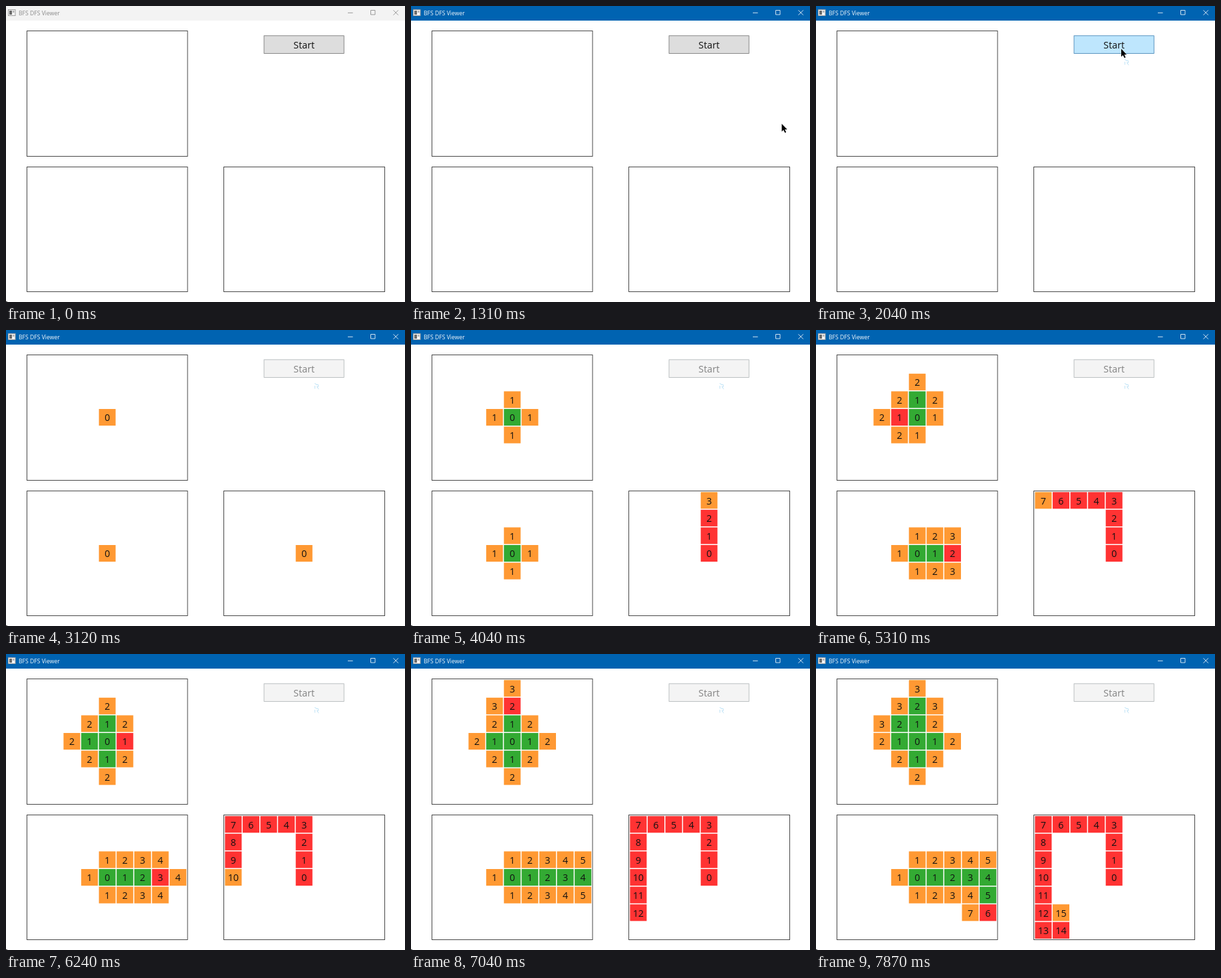
An HTML page that plays this animation: 600 by 446 pixels, repeating every 7.99 s.

```html
<!DOCTYPE html>
<html lang="en">
<head>
<meta charset="utf-8">
<title>BFS DFS Viewer</title>
<style>
  html, body { margin: 0; width: 100%; height: 100%; overflow: hidden; background: #fff; }
  svg { display: block; width: 600px; height: 446px; }
  text { font-family: "Open Sans", "Noto Sans", sans-serif; }
  .panel { fill: #fff; stroke: #484848; }
  #bar { color: #8a8a8a; fill: #f3f3f3; }
  #cells text, #label { font-size: 14.3px; text-anchor: middle; fill: #111; }
  #caption { font-size: 8.65px; fill: currentColor; }
  #controls { fill: none; stroke: currentColor; stroke-width: .85; }
  #button { stroke-width: .8; fill: #ddd; stroke: #707070; }
  .hover #button { fill: #bee6fd; stroke: #3c7fb1; }
  .pressed #button { fill: #c4e5f6; stroke: #2c628b; }
  .disabled #button { fill: #f4f4f4; stroke: #adb2b5; }
  .disabled #label { fill: #838383; }
  #echo { fill: none; stroke: #c0e3f6; }
  .idle #echo { display: none; }
</style>
</head>
<body>
<svg id="stage" viewBox="0 0 600 446">
  <rect width="600" height="446" fill="#fff"/>
  <g id="bar">
    <rect width="600" height="22"/>
    <rect x="3.5" y="5.5" width="10.5" height="9" fill="#f4f4f4" stroke="#a0a0a0"/>
    <rect x="5" y="7" width="4" height="6" fill="#6c6c6c"/>
    <rect x="10" y="7" width="2.5" height="3" fill="#b4b4b4"/>
    <text id="caption" x="19" y="13.6">BFS DFS Viewer</text>
    <path id="controls" d="M514 10.3h7.6M548.5 6.5h6.5v6.5h-6.5zM582.5 6.3l7.4 7.4M589.9 6.3l-7.4 7.4"/>
  </g>
  <rect class="panel" x="31.5" y="37.5" width="241.5" height="189"/>
  <rect class="panel" x="31.5" y="242.5" width="241.5" height="188"/>
  <rect class="panel" x="327.5" y="242.5" width="242" height="188"/>
  <rect y="445" width="2" height="1" fill="#444"/>
  <rect id="button" x="388" y="44.8" width="120.2" height="26.7"/>
  <text id="label" x="448.2" y="64.2">Start</text>
  <path id="echo" d="M464 80.5l3 1.5M464.5 84v4.5M466.5 82.5h3.2v3h-2.5M468 86l2.2 3.2"/>
  <g id="cells"></g>
  <path id="cursor" d="M0 .6V12.4L2.6 10L4.8 14.2L6.6 13.4L4.6 9.2H8.2Z" stroke="#fff" stroke-width=".9" paint-order="stroke"/>
</svg>
<script>
const LOOP = 7990;
const CAPTURE = 66.68;      // the screen refreshes in steps of this length
const SEARCH_START = 3098;
const STEP = 2.36;          // refreshes per search step
const COLS = 9, ROWS = 7, PITCH = 26.6, SIZE = 25.1;
const ORANGE = "#ff9933", RED = "#ff3333", GREEN = "#33aa33";
const DIRS = [[0, -1], [-1, 0], [0, 1], [1, 0]];

const $ = id => document.getElementById(id);
const key = (x, y) => y * COLS + x;
const inside = (x, y) => x >= 0 && y >= 0 && x < COLS && y < ROWS;
const progress = (t, from, to) => Math.min(1, Math.max(0, (t - from) / (to - from)));
const lerp = (a, b, p) => a + (b - a) * p;
const mix = (from, to, p) => `rgb(${from.map((v, i) => Math.round(lerp(v, to[i], p)))})`;

// Each yield is one visible step: [x, y, depth, colour]
function* frontierSearch(takeNext) {
  const seen = new Set([key(4, 3)]);
  const open = [[4, 3, 0]];
  yield [4, 3, 0, ORANGE];
  while (open.length) {
    const [x, y, depth] = takeNext(open);
    yield [x, y, depth, RED];
    for (const [dx, dy] of DIRS) {
      const nx = x + dx, ny = y + dy;
      if (!inside(nx, ny) || seen.has(key(nx, ny))) continue;
      seen.add(key(nx, ny));
      open.push([nx, ny, depth + 1]);
      yield [nx, ny, depth + 1, ORANGE];
    }
    yield [x, y, depth, GREEN];
  }
}

function* recursiveSearch(x = 4, y = 3, depth = 0, seen = new Set()) {
  seen.add(key(x, y));
  yield [x, y, depth, ORANGE];
  yield [x, y, depth, RED];
  for (const [dx, dy] of DIRS) {
    const nx = x + dx, ny = y + dy;
    if (inside(nx, ny) && !seen.has(key(nx, ny))) {
      yield* recursiveSearch(nx, ny, depth + 1, seen);
    }
  }
  yield [x, y, depth, GREEN];
}

const panels = [
  { left: 33.3, top: 39.2, steps: [...frontierSearch(open => open.shift())] },
  { left: 33.3, top: 244.2, steps: [...frontierSearch(open => open.pop())] },
  { left: 329.3, top: 244.2, steps: [...recursiveSearch()] }
];

function cellMarkup(left, top, [x, y, depth, colour]) {
  const px = left + x * PITCH, py = top + y * PITCH;
  return `<rect x="${px}" y="${py}" width="${SIZE}" height="${SIZE}" fill="${colour}"/>` +
    `<text x="${px + SIZE / 2}" y="${py + 18.4}">${depth}</text>`;
}

let shownCount = -1;
function drawCells(t) {
  const refreshes = Math.floor((t - SEARCH_START) / CAPTURE);
  const count = Math.max(0, Math.ceil((refreshes + 0.3) / STEP));
  if (count === shownCount) return;
  shownCount = count;
  $("cells").innerHTML = panels.map(({ left, top, steps }) => {
    const latest = new Map(steps.slice(0, count).map(s => [key(s[0], s[1]), s]));
    return [...latest.values()].map(s => cellMarkup(left, top, s)).join("");
  }).join("");
}

// Sweeps in from the right, settles on the button, then leaves sideways.
function drawPointer(t) {
  const now = Math.floor(t / 70) * 70;
  const enter = progress(now, 1150, 1510);
  const settle = 1 - (1 - progress(now, 1510, 2030)) ** 2;
  const leave = progress(now, 2440, 2600);
  const x = lerp(600, 461, enter) - 2 * settle + 115 * leave;
  const y = lerp(222, 74, enter) - 10 * settle + 16 * leave;
  $("cursor").setAttribute("transform", `translate(${x} ${y})`);
  $("cursor").style.display = enter > 0 && t < 2650 ? "" : "none";
}

function buttonState(t) {
  if (t < 1580) return "idle";
  if (t < 2190) return "hover";
  return t < 2320 ? "pressed" : "disabled";
}

function drawWindow(t) {
  const active = progress(t, 680, 900);
  $("bar").style.fill = mix([243, 243, 243], [0, 99, 177], active);
  $("bar").style.color = mix([138, 138, 138], [245, 248, 252], active);
  $("stage").setAttribute("class", buttonState(t));
}

const start = performance.now();
function frame() {
  const t = (performance.now() - start) % LOOP;
  drawWindow(t);
  drawCells(t);
  drawPointer(t);
  requestAnimationFrame(frame);
}
frame();
</script>
</body>
</html>
```
